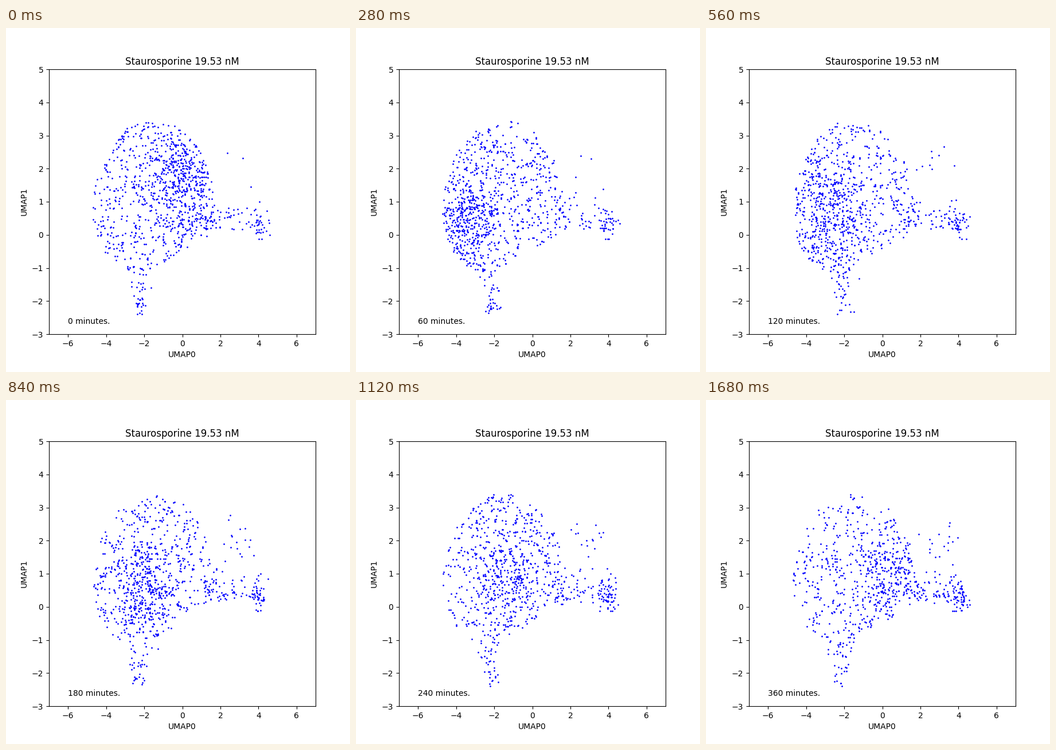
Recreate the animation shown at these times as a matplotlib script. Size 600x600 px, loop 1.82 s.

```python
import numpy as np
import matplotlib.pyplot as plt
from matplotlib.animation import FuncAnimation

FRAMES, INTERVAL, STEP = 13, 140, 30

# Where cells crowd together: minute, x, y
CROWD = np.array([(0, -.1, 1.7), (30, -3.9, .1), (90, -3.1, .6), (360, .2, .9)])


def in_body(x, y):
    """Rounded dome whose lower right side is cut by a slanted line."""
    dx, dy = np.abs(x + 1.5) / 3.2, y - .7
    dome = dx**2 + (dy / 2.75)**2 < 1
    bowl = dx**3 + (dy / 1.85)**2 < 1
    return np.where(dy > 0, dome, bowl) & (y > .33 * x - .46)


def inside(x, y, n):
    keep = in_body(x, y)
    return np.column_stack([x[keep], y[keep]])[:n]


def body(rng, minute, n):
    """Even spread over the body plus a drifting crowd."""
    cx, cy = (np.interp(minute, CROWD[:, 0], c) for c in CROWD[:, 1:].T)
    m, crowd = 8 * n, int(.4 * n)
    even = inside(rng.uniform(-4.7, 1.7, m), rng.uniform(-1.2, 3.5, m), n - crowd)
    dense = inside(rng.normal(cx, .9, m), rng.normal(cy, .85, m), crowd)
    return np.vstack([even, dense])


def arm(rng, n):
    """Thin bridge to the right with a knot at its end."""
    tip = n * 2 // 5
    x = np.append(rng.uniform(1.1, 4, n - tip), rng.normal(4.05, .24, tip))
    y = np.append(.1 + rng.gamma(2, .22, n - tip), rng.normal(.3, .26, tip))
    return np.column_stack([x.clip(max=4.6), y.clip(min=-.12)])


def tail(rng, n):
    depth = rng.uniform(0, 1, n)
    x = -2.2 + rng.normal(0, .36 - .16 * depth)
    return np.column_stack([x, -1.05 - 1.35 * depth])


def cells(minute):
    rng = np.random.default_rng(40 + minute)
    t = minute / 360
    strays = int(np.interp(minute, [60, 180], [2, 15]))
    pts = np.vstack([
        body(rng, minute, int(930 - 320 * t)),
        arm(rng, int(75 + 65 * t)),
        tail(rng, 36),
        rng.normal((3, 2.1), (.55, .38), (strays, 2)),
    ])
    # Some cells sit right beside a neighbour
    twins = len(pts) // 12
    pts[:twins] = pts[twins:2 * twins] + rng.normal(0, .04, (twins, 2))
    return pts


fig, ax = plt.subplots(figsize=(6, 6), dpi=100)
ax.set(xlim=(-7, 7), ylim=(-3, 5), xlabel="UMAP0", ylabel="UMAP1",
       title="Staurosporine 19.53 nM")
dots, = ax.plot([], [], "b.", markersize=2)
label = ax.text(-6, -2.69, "")


def update(i):
    minute = i * STEP
    dots.set_data(*cells(minute).T)
    label.set_text(f"{minute} minutes.")
    return dots, label


anim = FuncAnimation(fig, update, frames=FRAMES, interval=INTERVAL,
                     init_func=lambda: update(0), repeat=True)
plt.show()
```
